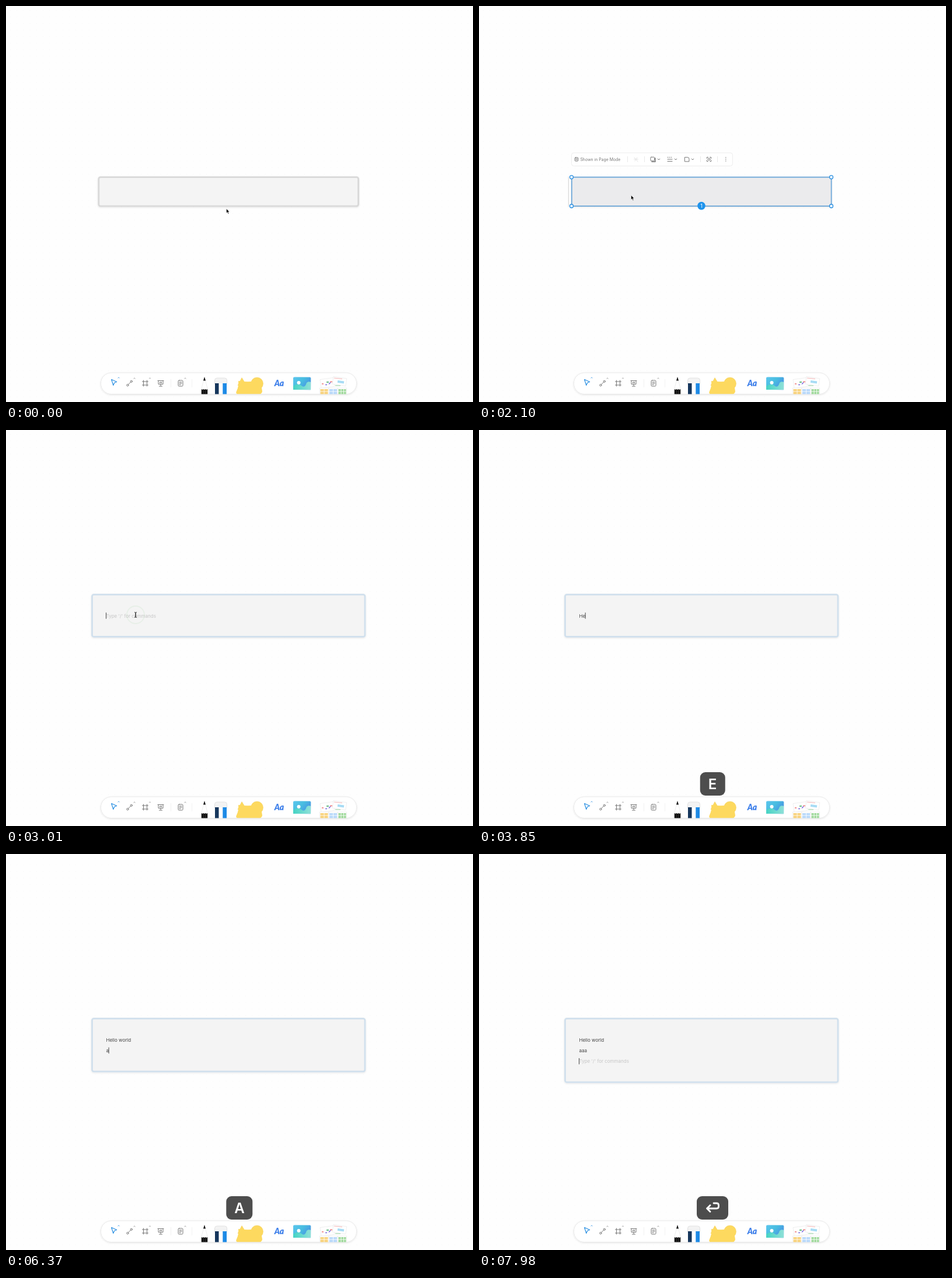
Animation of 800x677 px, one loop 8 s. Source, as an HTML page:

```html
<!DOCTYPE html>
<html lang="en">
<head>
<meta charset="utf-8">
<style>
  html, body { margin: 0; width: 100%; height: 100%; overflow: hidden; background: #fefefe; }
  svg { display: block; }
  #stage { position: absolute; left: 0; top: 0; }
  text { font-family: Inter, sans-serif; white-space: pre; }
  .icon { fill: none; stroke: #777; stroke-width: 1; stroke-linecap: round; stroke-linejoin: round; }
  .lines text { font-size: 8px; fill: #444; }
  .lines text.hint { fill: #c6c6c6; }
  #key {
    position: absolute; left: 400px; top: 585px; height: 40px; padding: 0 14px;
    transform: translateX(-50%); border-radius: 9px; background: #4d4d4d; color: #fff;
    font: 600 24px/41px Inter, sans-serif; display: flex; align-items: center;
  }
  #key path { fill: none; stroke: #fff; stroke-width: 2.8; stroke-linecap: round; stroke-linejoin: round; }
</style>
</head>
<body>
<svg id="stage" width="800" height="677" viewBox="0 0 800 677">
  <defs>
    <pattern id="dots" x="7" y="7" width="11.2" height="11.2" patternUnits="userSpaceOnUse">
      <rect width="1" height="1" fill="#f5f5f5"/>
    </pattern>
    <linearGradient id="sky" x2="1" y2=".6">
      <stop offset="0" stop-color="#5cc6ee"/><stop offset=".5" stop-color="#48bde0"/><stop offset="1" stop-color="#4a8fe6"/>
    </linearGradient>
    <linearGradient id="land" x2="1">
      <stop offset="0" stop-color="#45d3c4"/><stop offset="1" stop-color="#8fe0d8"/>
    </linearGradient>
    <filter id="soft" x="-10%" y="-40%" width="120%" height="180%">
      <feDropShadow dx="0" dy="1" stdDeviation="1.6" flood-opacity=".1"/>
    </filter>
    <path id="chevron" class="icon" d="M-1.8 -.8L0 1L1.8 -.8"/>
    <path id="caretUp" d="M-1.5 .7L0 -.7L1.5 .7" fill="none" stroke-width=".8"/>
  </defs>
  <rect width="800" height="677" fill="url(#dots)"/>

  <rect id="note" rx="3" filter="url(#soft)"/>

  <g id="selection">
    <path d="M153.3 292V343" stroke="#d0d0d0"/>
    <g id="handles" fill="#fff" stroke="#2b90e2" stroke-width="1.3"></g>
    <circle cx="381" cy="341.6" r="6.8" fill="#1e93ec"/>
    <text x="381" y="345" font-size="9" fill="#fff" text-anchor="middle">1</text>

    <rect x="158.5" y="251" width="276" height="22.5" rx="4" fill="#fff" stroke="#ededed"/>
    <text x="173.4" y="264.5" font-size="6.9" fill="#777">Shown in Page Mode</text>
    <path d="M254.5 257v10M283.5 257v10M379.5 257v10M408.5 257v10" stroke="#e8e8e8"/>
    <g class="icon">
      <rect x="164.3" y="259" width="5.4" height="6.2" rx="1"/>
      <path d="M166 261h2M166 263h2"/>
      <path stroke="#e4e4e4" d="M266 259l6 7M267 265l4-6M265.5 262h7"/>
      <rect x="294" y="258.3" width="6.5" height="6.5" rx="1"/>
      <path stroke-width="1.4" d="M296 266.3h6V260"/>
      <path d="M323 262h8M323 265.5h8"/>
      <path stroke-dasharray="1 2" d="M323 258.7h8"/>
      <path d="M352.3 265.5v-6.8h5q2.6 0 2.6 2.6v4.2z"/>
      <path d="M390.4 260.5v-2h2M395.6 258.5h2v2M397.6 263.7v2h-2M392.4 265.7h-2v-2"/>
      <circle cx="394" cy="262" r="1.8"/>
      <path stroke-width="1.4" d="M422.8 259v0M422.8 262v0M422.8 265v0"/>
    </g>
    <use href="#chevron" x="308" y="262"/><use href="#chevron" x="337" y="262"/><use href="#chevron" x="366" y="262"/>
  </g>

  <g class="lines" id="lines">
    <text x="171.5" y="320.5"></text><text x="171.5" y="338.9"></text><text x="171.5" y="357.3"></text>
  </g>
  <rect id="caret" width=".9" height="10.5" fill="#333"/>

  <g id="dock">
    <rect x="162.5" y="627" width="438" height="36.5" rx="18" fill="#fff" stroke="#e9e9e9" filter="url(#soft)"/>
    <path d="M282.5 638v14M318.5 638v14" stroke="#f2f2f2"/>
    <path class="icon" style="stroke:#2b90e2;stroke-width:1.2" d="M180.6 638.5l9 4-4 1.7-1.8 4.3z"/>
    <use href="#caretUp" x="193" y="635.5" stroke="#2b90e2"/>
    <g stroke="#888">
      <use href="#caretUp" x="220" y="636.5"/><use href="#caretUp" x="246.5" y="636.5"/><use href="#caretUp" x="307" y="636.5"/>
    </g>
    <g class="icon">
      <circle cx="208.3" cy="648.3" r="1.6"/><circle cx="214.7" cy="641.8" r="1.6"/><path d="M209.6 647l3.9-4"/>
      <path d="M235.5 640v10M241.5 640v10M233.5 642h10M233.5 648h10"/>
      <path d="M260 640.5h10M261 640.5v6h8v-6M265 646.5v3M262.5 650h5M263.5 644.5v-1M265 644.5v-2M266.5 644.5v-1.5"/>
      <rect x="295" y="640" width="8" height="10" rx="1.5"/><path d="M297 643h4M297 645.2h4M297 647.4h2"/>
    </g>

    <path d="M340 635l5.5 20v8.5h-11V655z" fill="#fff" stroke="#e6e6e6" stroke-width=".7"/>
    <path d="M340 634l2 6.5h-4zM334.8 655l1.7 1 1.7-1 1.8 1 1.8-1 1.7 1 1.7-1v8.5h-10.4z" fill="#111"/>
    <path d="M338.2 656v7.5M341.8 656v7.5" stroke="#444" stroke-width=".6"/>

    <path d="M357.5 646v-6q0-4 4-4h13q4 0 4 4v6z" fill="#f3f3f3" stroke="#dcdcdc" stroke-width=".8"/>
    <path d="M358 645h6.7v18.5H358z" fill="#16365c"/>
    <path d="M364.7 645h6.6v18.5h-6.6z" fill="#fff"/>
    <path d="M371.3 645h6.7v18.5h-6.7z" fill="#1e8ae6"/>

    <g fill="#fdd95f" stroke="#f0ca50" stroke-width=".5">
      <circle cx="430" cy="645.5" r="10.5"/>
      <path d="M404 635.5l8 13h-15z"/>
      <path d="M398 641q19 3 38-1l3 19q-1 4-4 4.3h-39q-3-1-1-5 4-8 3-17z" stroke="none"/>
    </g>

    <text x="468" y="650" text-anchor="middle" fill="#3d7fea" style="font:italic 900 14px Lato,sans-serif">Aa</text>

    <rect x="493" y="634.5" width="30" height="22" rx="2" fill="#d9ecf6" transform="rotate(3 508 645)"/>
    <rect x="492" y="634.5" width="30" height="21.5" rx="1.5" fill="url(#sky)"/>
    <path d="M492 650q8-6 14-1t9-5q3-3 7-1v13h-30z" fill="url(#land)"/>
    <circle cx="501.5" cy="644" r="3" fill="#fff"/>

    <g stroke="#e6e6e6" stroke-width=".6" fill="#fff">
      <rect x="539" y="637" width="23" height="15" transform="rotate(-8 550 645)"/>
      <rect x="560" y="635" width="23" height="13" transform="rotate(9 571 641)"/>
      <rect x="537.5" y="653" width="15" height="10.5"/><rect x="553" y="653" width="15" height="10.5"/><rect x="568.5" y="653" width="15" height="10.5"/>
    </g>
    <g fill="none" stroke-width="1.6">
      <path d="M541 646h3M555 642.5h4" stroke="#e77"/>
      <path d="M547 647.5h3M553 646.5l3-3" stroke="#7a6be0"/>
      <path d="M549 643h4" stroke="#4a6"/>
      <path d="M568 642l11 1.5" stroke="#a8dcf5" stroke-width="4"/>
      <path d="M562 636l14 1.5" stroke="#f3b3b3" stroke-width="1"/>
      <path d="M564 649h9" stroke="#b9dfc0"/>
    </g>
    <path d="M538.5 655h13v8.5h-13z" fill="#f8d27c"/>
    <path d="M554 655h13v8.5h-13z" fill="#b9d9fa"/>
    <path d="M569.5 655h13v8.5h-13z" fill="#9fd99b"/>
    <path d="M538 659h45M545 655v8.5M560.5 655v8.5M574 655v8.5M578.5 655v8.5" stroke="#fff" stroke-width=".8"/>
  </g>

  <circle id="ripple" fill="none" stroke="#9ed69e" stroke-width="1.8"/>
  <path id="arrow" d="M0 0v7.6l1.8-1.6 1.3 2.9 1.3-.6-1.3-2.8h2.3z" fill="#000" stroke="#fff" stroke-width=".6"/>
  <path id="beam" d="M-2 -4.5q2 0 2 1.5v6q0 1.5-2 1.5M2 -4.5q-2 0-2 1.5v6q0 1.5 2 1.5" fill="none" stroke="#222" stroke-width=".9"/>
</svg>
<div id="key"></div>

<script>
const LOOP = 8000, STEP = 70;
const SELECT = 980, EDIT = 2660;
const LINE = 18.4, TEXT_X = 171.5, BLINK = 530;
const HINT = "Type '/' for commands";

// [key shown, character, text changes]
const strokes = [
  [3430, 'H', 3640], [3850, 'e'], [4270, 'l'], [4480, 'l'], [4760, 'o'], [4900, ' '],
  [5040, 'w'], [5180, 'o'], [5320, 'r'], [5530, 'l'], [5880, 'd'], [6090, '\n', 6160],
  [6370, 'a'], [6580, 'a'], [6720, 'a'], [6860, '\n', 6890], [7980, '\n', LOOP]
].map(([shown, char, typed = shown]) => ({ shown, char, typed }));

const keyIcon = d => `<svg width="26" height="26"><path d="${d}"/></svg>`;
const keyFaces = {
  '\n': keyIcon('M15 5h5q3.5 0 3.5 3.5v2q0 3.500-3.500 3.500H3.500M9 8.500L3.500 14 9 19.500'),
  ' ': keyIcon('M3 12v6h20v-6')
};

const el = id => document.getElementById(id);
const set = (node, attrs) => { for (const k in attrs) node.setAttribute(k, attrs[k]); };
const show = (node, on) => { node.style.display = on ? '' : 'none'; };
const clamp = v => Math.min(1, Math.max(0, v));
const progress = (t, from, to) => clamp((t - from) / (to - from));
const ease = p => (1 - Math.cos(Math.PI * p)) / 2;
const mix = (a, b, p) => a + (b - a) * p;

el('handles').innerHTML = [158.5, 603.5].flatMap(x => [292.6, 342].map(y =>
  `<circle cx="${x}" cy="${y}" r="3"/>`)).join('');

function drawNote(t, lineCount) {
  const out = 11.3 * ease(progress(t, 2620, 2970));
  const selected = t >= SELECT && t < EDIT;
  set(el('note'), {
    x: 158.8 - out, y: 292.6 - out,
    width: 444.800 + 2 * out, height: 49.500 + 2 * out + (lineCount - 1) * LINE,
    fill: selected ? '#ebebed' : '#f4f4f4',
    stroke: selected ? '#69a5d8' : t < SELECT ? '#d9d9d9' : '#d1e0ed',
    'stroke-width': selected ? 1.7 : 2.8
  });
  show(el('selection'), selected);
}

function drawText(t, lines) {
  const editing = t >= EDIT;
  const nodes = [...el('lines').children];
  nodes.forEach((node, i) => {
    const active = editing && i === lines.length - 1;
    const hint = active && !lines[i];
    node.textContent = hint ? HINT : lines[i] || '';
    node.setAttribute('class', hint ? 'hint' : '');
  });
  const last = lines.length - 1;
  const width = lines[last] ? nodes[last].getComputedTextLength() : 0;
  const touched = Math.max(EDIT, ...strokes.map(s => s.typed).filter(at => at <= t));
  set(el('caret'), { x: TEXT_X - .4 + width, y: 312.2 + last * LINE });
  show(el('caret'), editing && Math.floor((t - touched) / BLINK) % 2 === 0);
}

function drawKey(t) {
  const stroke = strokes.filter(s => s.shown <= t).pop();
  const key = el('key');
  show(key, stroke);
  if (!stroke) return;
  key.innerHTML = keyFaces[stroke.char] || stroke.char.toUpperCase();
  key.style.opacity = 1 - progress(t, stroke.shown + 700, stroke.shown + 980);
}

function drawPointer(t) {
  const first = ease(progress(t, 0, 770)), second = ease(progress(t, 2030, 2520));
  const x = mix(mix(377.5, 262.5, first), 222, second);
  const y = mix(mix(346.5, 324, first), 316, second);
  const place = { transform: `translate(${x} ${y})` };
  set(el('arrow'), place);
  set(el('beam'), place);
  show(el('arrow'), t < EDIT);
  show(el('beam'), t >= EDIT && t < strokes[0].typed);

  const p = progress(t, t < EDIT ? SELECT : EDIT, (t < EDIT ? SELECT : EDIT) + 420);
  set(el('ripple'), { cx: x, cy: y, r: 10 + 6 * p, opacity: .85 * (1 - p) });
  show(el('ripple'), t >= SELECT && p < 1);
}

function draw(now) {
  const t = Math.floor(now % LOOP / STEP) * STEP;
  const lines = strokes.filter(s => s.typed <= t).map(s => s.char).join('').split('\n');
  drawNote(t, lines.length);
  drawText(t, lines);
  drawKey(t);
  drawPointer(t);
}

const start = performance.now();
function tick() {
  draw(performance.now() - start);
  requestAnimationFrame(tick);
}
tick();
</script>
</body>
</html>
```
